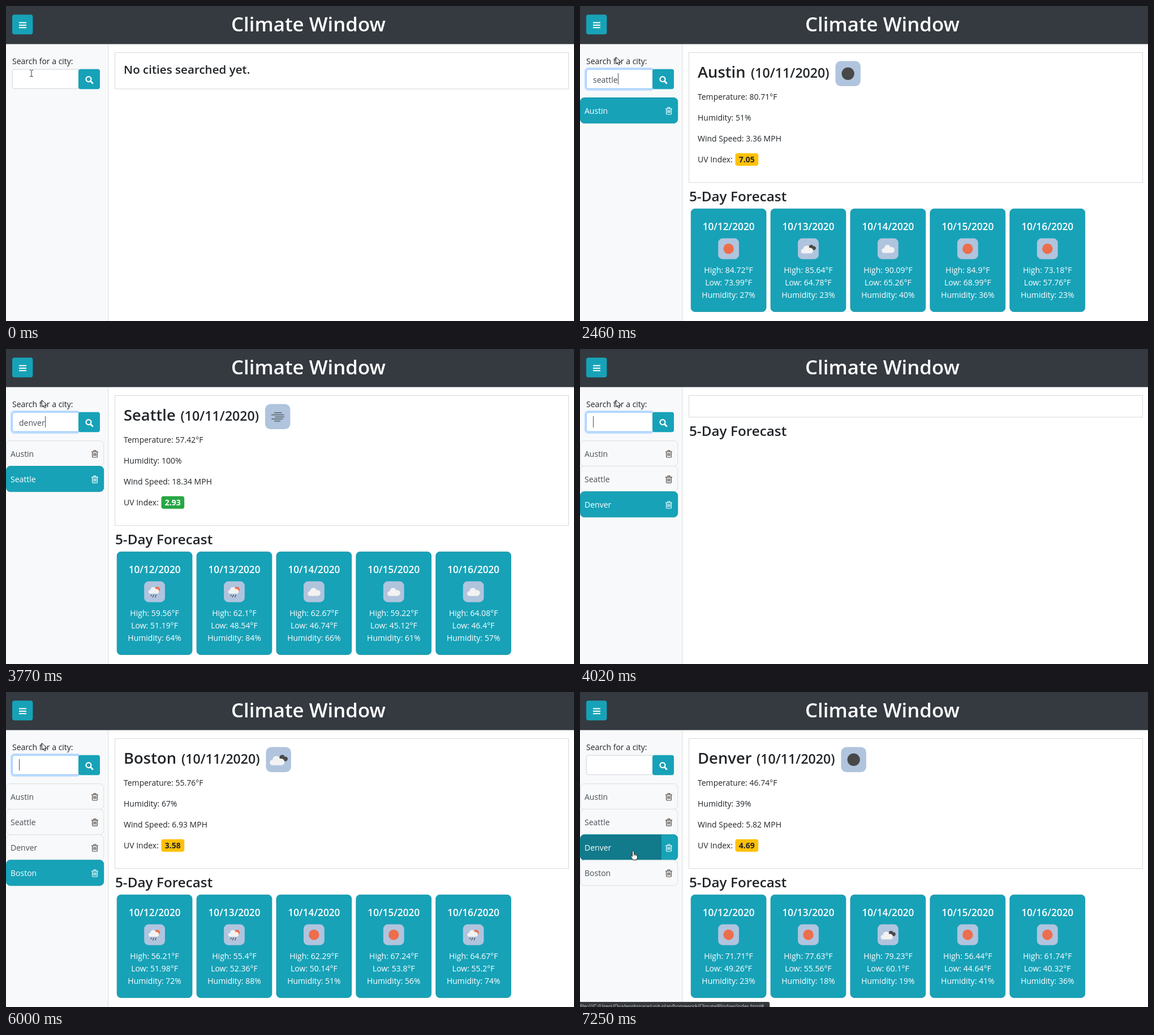
These frames come from a looping animation (1004x558 px, 8 s). An HTML page:

```html
<!DOCTYPE html>
<html lang="en">
<head>
<meta charset="utf-8">
<title>Climate Window</title>
<style>
html, body { margin: 0; width: 100%; height: 100%; overflow: hidden; background: #fff; }
svg { display: block; width: 1004px; height: 558px; }
text { font: 14px "Open Sans", "Noto Sans", sans-serif; fill: #212529; white-space: pre; }
.mid { text-anchor: middle; }
.white { fill: #fff; }
.muted { fill: #495057; }
.title { font-size: 34.8px; font-weight: 600; }
.city { font-size: 27.4px; font-weight: 600; }
.date { font-size: 23.2px; font-weight: 600; }
.h3 { font-size: 24.3px; font-weight: 600; }
.h4 { font-size: 20.6px; font-weight: 600; }
.day { font-size: 17.2px; font-weight: 600; }
.badge { font-weight: 700; }
.status { font-size: 8.6px; fill: #c8cbce; }
</style>
</head>
<body>
<svg id="stage" viewBox="0 0 1004 558"></svg>
<script>
const TEAL = '#17a2b8', DARK = '#484848', ORANGE = '#ec6e4c', AMBER = '#ffc107', GREEN = '#28a745';
const LOOP = 8000;
const cities = ['Austin', 'Seattle', 'Denver', 'Boston'];
const dateX = [302, 308.5, 312, 310];

// Each day: icon, high, low, humidity
const denverDays = ['sun 71.71 49.44 23', 'sun 77.63 55.56 18', 'broken 79.23 60.1 19', 'sun 56.44 44.64 41', 'sun 61.74 40.32 36'];
const reports = {
  austin: { city: 0, icon: 'moon', temp: '80.71', hum: 51, wind: '3.36', uv: '7.05', color: AMBER,
    days: ['sun 84.72 73.99 27', 'broken 85.64 64.78 23', 'cloud 90.09 65.26 40', 'sun 84.9 68.99 36', 'sun 73.18 57.76 23'] },
  seattle: { city: 1, icon: 'mist', temp: '57.42', hum: 100, wind: '18.34', uv: '2.93', color: GREEN,
    days: ['rain 59.56 51.19 64', 'rain 62.1 48.54 84', 'cloud 62.67 46.74 66', 'cloud 59.22 45.12 61', 'cloud 64.08 46.4 57'] },
  denver: { city: 2, icon: 'fewNight', temp: '48', hum: 27, wind: '14.99', uv: '4.69', color: AMBER, days: denverDays },
  boston: { city: 3, icon: 'broken', temp: '55.76', hum: 67, wind: '6.93', uv: '3.58', color: AMBER,
    days: ['rain 56.21 51.98 72', 'rain 55.4 52.36 88', 'sun 62.29 50.14 51', 'sun 67.24 53.8 56', 'rain 64.67 55.2 74'] }
};
reports.denverLater = { ...reports.denver, icon: 'moon', temp: '46.74', hum: 39, wind: '5.82',
  days: ['sun 71.71 49.26 23', ...denverDays.slice(1)] };

// Each step changes part of the state; typed === null means the field has no focus
const steps = [
  [0, { typed: null, caret: true, count: 0, active: -1, hover: -1, report: null, pointer: 'beam', x: 45, y: 119 }],
  [250, { typed: '' }],
  [500, { typed: 'aus' }],
  [750, { typed: 'austin' }],
  [1250, { typed: '', count: 1, active: 0 }],
  [1495, { report: 'austin', pointer: 'arrow', x: 63.5, y: 90.5 }],
  [1740, { typed: 'se' }],
  [1985, { typed: 'seat' }],
  [2230, { typed: 'seattl' }],
  [2460, { typed: 'seattle' }],
  [2710, { typed: '', count: 2, active: 1, report: null }],
  [2980, { report: 'seattle' }],
  [3230, { typed: 'de' }],
  [3500, { typed: 'denve' }],
  [3770, { typed: 'denver' }],
  [4020, { typed: '', count: 3, active: 2, report: null }],
  [4270, { report: 'denver' }],
  [4520, { typed: 'bo' }],
  [4770, { typed: 'bost' }],
  [5020, { typed: 'boston' }],
  [5265, { typed: '', count: 4, active: 3, report: 'boston' }],
  [5755, { caret: false }],
  [6000, { caret: true }],
  [6250, { pointer: 'hand', x: 57, y: 192, hover: 0 }],
  [6500, { typed: null, active: 0, report: null }],
  [6750, { report: 'austin' }],
  [7000, { x: 94, y: 281.5, hover: 2, active: 2, report: null }],
  [7250, { report: 'denverLater' }]
];

const text = (x, y, s, cls = '') => `<text x="${x}" y="${y}" class="${cls}">${s}</text>`;
const rect = (x, y, w, h, fill, r = 0, more = '') =>
  `<rect x="${x}" y="${y}" width="${w}" height="${h}" rx="${r}" fill="${fill}" ${more}/>`;
const circle = (x, y, r, fill) => `<circle cx="${x}" cy="${y}" r="${r}" fill="${fill}"/>`;
const line = (d, color, width, more = '') =>
  `<path d="${d}" fill="none" stroke="${color}" stroke-width="${width}" ${more}/>`;
const place = (x, y, body, scale = 1) => `<g transform="translate(${x} ${y}) scale(${scale})">${body}</g>`;
const cloud = (x, y, scale, fill) => place(x, y,
  `<path fill="${fill}" d="M-7 7.5A4.2 4.2 0 0 1-6.8-.9A5.8 5.8 0 0 1 4.6-2.6A5.2 5.2 0 1 1 6 7.5Z"/>`, scale);

const icons = {
  sun: circle(0, 0, 9.2, ORANGE),
  moon: circle(0, 0, 9.2, DARK),
  cloud: cloud(0, 0, 1, '#f2f2f2'),
  fewNight: circle(5, -1.5, 7, DARK) + cloud(-.5, .8, 1, '#f2f2f2'),
  broken: cloud(6, -2.5, .65, DARK) + cloud(-2.2, 1.2, .95, '#f2f2f2'),
  rain: circle(4.5, -3.8, 5, ORANGE) + cloud(-1.5, -2.6, .82, '#f2f2f2') +
    line('M-5 5l-1.5 3M-1 5l-1.5 3M3 5l-1.5 3M-2.5 8l-1 2M2 8l-1 2', DARK, 1.2),
  mist: line('M-5-5.7H6M-9.3-2.6H9.3M-4 .4H9.5M-9 3.4H7.5M-5 6.4H4', '#5d6a70', 1.5)
};
const weather = (x, y, name, scale = 1) =>
  place(x, y, rect(-18.4, -18.4, 36.8, 36.8, '#b0c4de', 8) + icons[name], scale);

const pointers = {
  beam: line('M-3-5.5H-1L0-4.5 1-5.5H3M0-4.5V5M-3 6H-1L0 5 1 6H3', '#333', 1),
  arrow: '<path d="M0 0V12.2L2.8 9.6 4.8 14 6.8 13.1 4.9 8.8H8.6Z" fill="#fff" stroke="#222"/>',
  hand: '<path d="M-1.5 1.2Q0-1 1.4 1.2V6Q3 4.8 3.8 6.5 5.2 5.4 6 7 7.6 6.3 7.6 8.5V11.5L6 16H-.2L-4 10.6Q-4.4 8.6-2.5 9L-1.5 10Z" fill="#fff" stroke="#222"/>' +
    line('M1.4 6V9M3.8 6.5V9M6 7V9.5', '#222', .8)
};

const trash = (y, color) => place(157, y,
  line('M-6-4H6M-2.5-4L-1.8-6.2H1.8L2.5-4M-4.4-4V4.8Q-4.4 6-3.2 6H3.2Q4.4 6 4.4 4.8V-4M-2-1.8V3.6M0-1.8V3.6M2-1.8V3.6', color, 1.15));

function frameParts() {
  return rect(0, 67, 180.5, 491, '#f8f9fa') + rect(180.4, 67, 1, 491, '#d9dbdd') +
    rect(0, 0, 1004, 67.5, '#343a40') +
    rect(11, 15.3, 36.4, 35, TEAL, 4) + line('M23 29.5H36M23 34H36M23 38.3H36', '#fff', 2) +
    text(534.5, 45, 'Climate Window', 'title white mid') +
    text(11, 103, 'Search for a city:');
}

function searchField(s) {
  const focus = s.typed !== null;
  return (focus ? rect(9.5, 110.5, 120.5, 38, 'none', 5, 'stroke="#bfdeff" stroke-width="3"') : '') +
    `<path d="M128.5 112.2H15.2a4 4 0 0 0-4 4V142.4a4 4 0 0 0 4 4H128.5Z" fill="#fff" stroke="${focus ? '#80bdff' : '#ced4da'}"/>` +
    rect(128, 111.7, 38, 35.5, TEAL, 4) +
    '<circle cx="146" cy="129.6" r="4.5" fill="none" stroke="#fff" stroke-width="2.2"/>' +
    line('M149.3 133L153 136.7', '#fff', 2.8, 'stroke-linecap="round"') +
    (focus ? `<text id="typed" x="23" y="135.5" class="muted">${s.typed}</text>` : '') +
    (focus && s.caret ? rect(23, 119, 1, 20, '#495057', 0, 'id="caret"') : '');
}

function cityItem(name, i, s) {
  const y = 162.5 + 45.1 * i, on = i === s.active, over = i === s.hover;
  const fill = on ? TEAL : '#f8f9fa';
  let out = rect(.5, y, 172.2, 45.1, fill, 7, `stroke="${on ? '#1697ac' : '#dcdee0'}"`);
  if (over) out += `<path d="M144 ${y}H7.5a7 7 0 0 0-7 7v31.1a7 7 0 0 0 7 7H144Z" fill="${on ? '#117a8b' : '#e9ecef'}"/>`;
  return out + text(8, y + 28.5, name, on ? 'white' : 'muted') + trash(y + 23.5, on ? '#fff' : '#4d4642');
}

function dayCard(row, i) {
  const [icon, high, low, hum] = row.split(' ');
  const x = 196.2 + 140.9 * i, mid = x + 66.4;
  return rect(x, 359.3, 132.8, 182.2, TEAL, 7, 'stroke="#158fa3" stroke-width=".8"') +
    text(mid, 396.5, `10/${12 + i}/2020`, 'day white mid') +
    weather(mid, 430, icon) +
    text(mid, 473, `High: ${high}°F`, 'white mid') +
    text(mid, 495, `Low: ${low}°F`, 'white mid') +
    text(mid, 517, `Humidity: ${hum}%`, 'white mid');
}

function mainPanel(s) {
  const r = reports[s.report];
  const bottom = r ? 312.7 : s.count ? 120.7 : 146.9;
  let out = rect(192.5, 82.5, 802, bottom - 82.5, '#fff', 0, 'stroke="#d6d8da"');
  if (!s.count) out += text(208, 119.5, 'No cities searched yet.', 'h4');
  if (r || s.count > 1) out += text(193, bottom + 33, '5-Day Forecast', 'h3');
  if (!r) return out;
  const x = dateX[r.city];
  return out + text(208, 127, cities[r.city], 'city') + text(x, 127, '(10/11/2020)', 'date') +
    weather(x + 171.7, 119.8, r.icon, 1.21) +
    text(208, 166, `Temperature: ${r.temp}°F`) +
    text(208, 203, `Humidity: ${r.hum}%`) +
    text(208, 240, `Wind Speed: ${r.wind} MPH`) +
    text(208, 277, 'UV Index:') +
    rect(274.5, 260.7, 40.7, 22.3, r.color, 4) +
    text(294.8, 277, r.uv, r.color === GREEN ? 'badge white mid' : 'badge mid') +
    r.days.map(dayCard).join('');
}

const statusBar = () => rect(-4, 549, 339.3, 14, '#35383b', 3) +
  text(0, 559.5, 'file:///C:/Users/Ova/workspace/unit-plan/homework/ClimateWindow/index.html#', 'status');

const stage = document.getElementById('stage');

function render(s) {
  stage.innerHTML = frameParts() + searchField(s) +
    cities.slice(0, s.count).map((name, i) => cityItem(name, i, s)).join('') +
    mainPanel(s) + (s.hover >= 0 ? statusBar() : '') + place(s.x, s.y, pointers[s.pointer]);
  const caret = document.getElementById('caret');
  if (caret && s.typed) caret.setAttribute('x', Math.round(23 + document.getElementById('typed').getComputedTextLength()));
}

let shown = 0;
function tick() {
  const t = performance.now() % LOOP;
  const past = steps.filter(([at]) => at <= t);
  if (past.length !== shown) {
    shown = past.length;
    render(Object.assign({}, ...past.map(([, change]) => change)));
  }
  requestAnimationFrame(tick);
}
tick();
</script>
</body>
</html>
```
